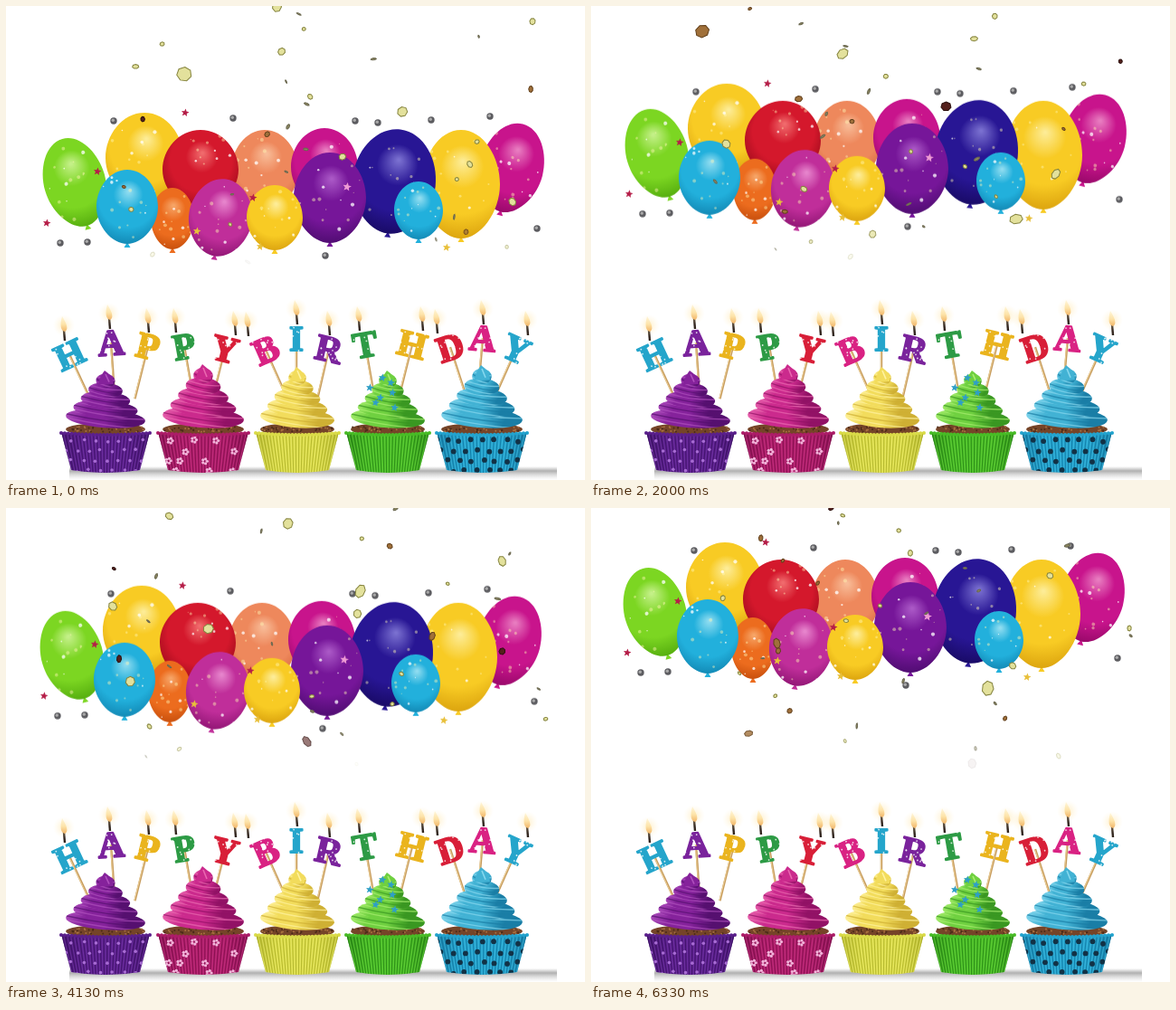
An HTML page with a canvas for the animation above (6390 ms loop, 640x524 px).

```html
<!DOCTYPE html>
<html lang="en">
<head>
<meta charset="utf-8">
<title>Happy Birthday</title>
<style>
html, body { margin: 0; width: 100%; height: 100%; overflow: hidden; background: #fff; }
canvas { display: block; }
</style>
</head>
<body>
<canvas id="stage" width="640" height="524"></canvas>
<script>
const W = 640, H = 524, LOOP = 6390, FRAMES = 96, TAU = Math.PI * 2;
const ctx = document.getElementById('stage').getContext('2d');

function seeded(s) {
  return () => {
    s = (s * 1664525 + 1013904223) >>> 0;
    return s / 4294967296;
  };
}

function layer(draw) {
  const c = document.createElement('canvas');
  c.width = W;
  c.height = H;
  draw(c.getContext('2d'));
  return c;
}

function disc(g, x, y, r, fill) {
  g.fillStyle = fill;
  g.beginPath();
  g.arc(x, y, r, 0, TAU);
  g.fill();
}

function line(g, x1, y1, x2, y2, color, width) {
  g.strokeStyle = color;
  g.lineWidth = width;
  g.beginPath();
  g.moveTo(x1, y1);
  g.lineTo(x2, y2);
  g.stroke();
}

function star(g, x, y, r, fill) {
  g.fillStyle = fill;
  g.beginPath();
  for (let i = 0; i < 10; i++) {
    const a = i * TAU / 10 - 1.4, d = i % 2 ? r * 0.45 : r;
    g.lineTo(x + d * Math.cos(a), y + d * Math.sin(a));
  }
  g.fill();
}

function shade(gradient, colors) {
  colors.forEach((c, i) => gradient.addColorStop(i / (colors.length - 1), c));
  return gradient;
}

// ---- cupcakes ----

const CAKE_TOP = 469, CAKE_BOTTOM = 516;

function frosting(g, x, tip, half, [light, mid, dark]) {
  const base = CAKE_TOP - 3, h = base - tip, tiers = 5;
  for (let i = 0; i < tiers; i++) {
    const rx = half * (1 - i * 0.19), ry = h * (0.165 - i * 0.01);
    g.save();
    g.translate(x, base - h * (0.16 + i * 0.165));
    g.rotate(0.07);
    g.fillStyle = shade(g.createLinearGradient(-rx, -ry, rx * 0.5, ry), [light, mid, mid, dark]);
    g.beginPath();
    g.ellipse(0, 0, rx, ry, 0, 0, TAU);
    g.fill();
    g.clip();
    for (let k = 0; k < 3; k++) {
      g.strokeStyle = k % 2 ? dark : light;
      g.lineWidth = 1.4;
      g.globalAlpha = 0.7;
      g.beginPath();
      g.moveTo(-rx, ry * (k * 0.4 - 0.6));
      g.quadraticCurveTo(rx * 0.1, ry * (0.1 + k * 0.4), rx, ry * (k * 0.5 - 0.2));
      g.stroke();
    }
    g.restore();
  }
  g.fillStyle = mid;
  g.beginPath();
  g.moveTo(x - half * 0.2, base - h * 0.76);
  g.quadraticCurveTo(x - 5, base - h * 0.92, x - 1, tip);
  g.quadraticCurveTo(x + 9, base - h * 0.9, x + half * 0.2, base - h * 0.76);
  g.fill();
  line(g, x, tip + 4, x + 4, base - h * 0.8, light, 1.6);
}

function wrapper(g, x, half, [light, mid, dark], decorate) {
  const foot = half - 11, top = CAKE_TOP, rnd = seeded(x);
  g.fillStyle = '#754428';
  g.beginPath();
  g.ellipse(x, top - 1, half - 5, 7, 0, 0, TAU);
  g.fill();
  for (let i = 0; i < 40; i++) disc(g, x + (rnd() - 0.5) * half * 1.7, top - 4 + rnd() * 6, 1, i % 2 ? '#a8703f' : '#4b2a18');

  g.save();
  g.beginPath();
  g.moveTo(x - half, top + 2);
  g.quadraticCurveTo(x, top + 7, x + half, top + 2);
  g.lineTo(x + foot, CAKE_BOTTOM - 3);
  g.quadraticCurveTo(x, CAKE_BOTTOM + 3, x - foot, CAKE_BOTTOM - 3);
  g.fillStyle = shade(g.createLinearGradient(x - half, 0, x + half, 0), [dark, mid, mid, mid, dark]);
  g.fill();
  g.clip();
  for (let k = -1; k <= 1; k += 0.08) {
    line(g, x + half * k, top, x + foot * k, CAKE_BOTTOM + 2, dark, 0.8);
    line(g, x + half * k + 2, top, x + foot * k + 1.6, CAKE_BOTTOM + 2, light, 0.6);
  }
  if (decorate) {
    for (let row = 0; row < 4; row++) {
      for (let col = -4; col <= 4; col++) {
        decorate(g, x + col * 13 + (row % 2) * 6 + rnd() * 3, top + 10 + row * 11 + rnd() * 3);
      }
    }
  }
  g.restore();
  for (let k = -1; k <= 1; k += 0.08) disc(g, x + half * k, top + 3 + 2 * (1 - k * k), 2, mid);
}

const dots = (g, x, y) => disc(g, x, y, 1.8, '#a86cd4');
const spots = (g, x, y) => disc(g, x, y, 2.9, '#123246');
function flowers(g, x, y) {
  if (Math.round(x) % 2) return;
  for (let a = 0; a < TAU; a += TAU / 5) disc(g, x + 2.6 * Math.cos(a), y + 2.6 * Math.sin(a), 1.6, '#f2b4da');
}

const cupcakes = [
  { x: 110, half: 49, tip: 403, cream: ['#ae4fbd', '#85229b', '#561070'], paper: ['#7b3cae', '#5a1f8c', '#3f1268'], decorate: dots },
  { x: 218, half: 50, tip: 396, cream: ['#ea68b0', '#cb2a8d', '#921266'], paper: ['#cf3c8c', '#ad1c68', '#82104e'], decorate: flowers },
  { x: 322, half: 46, tip: 399, cream: ['#fff2a0', '#f2dc5c', '#cfb034'], paper: ['#f0f074', '#dadb48', '#aeb12a'] },
  { x: 422, half: 46, tip: 403, cream: ['#a8ee70', '#6fd040', '#3a9822'], paper: ['#70da42', '#48bc26', '#288615'] },
  { x: 526, half: 50, tip: 397, cream: ['#86d8ee', '#42b2d4', '#1a7ea6'], paper: ['#48c0e2', '#22a3ce', '#1478a0'], decorate: spots }
];

// ---- letter candles ----

const BLUE = '#25a5cb', PURPLE = '#7a239c', GOLD = '#eab41e', GREEN = '#2d9b45', RED = '#d81f38', PINK = '#d92283';

// letter, colour, centre, tilt in degrees, x of the flame
const candles = [
  ['H', BLUE, 70, 385, -25, 64], ['A', PURPLE, 116, 372, -4, 114], ['P', GOLD, 157, 376, 14, 157],
  ['P', GREEN, 197, 376, -10, 187], ['Y', RED, 242, 379, 14, 253], ['B', PINK, 287, 380, -24, 267],
  ['I', BLUE, 321, 367, 0, 321], ['R', PURPLE, 357, 379, 13, 357], ['T', GREEN, 397, 374, -10, 390],
  ['H', GOLD, 449, 374, 14, 460], ['D', RED, 491, 377, -18, 476], ['A', PINK, 527, 367, 5, 527],
  ['Y', BLUE, 564, 379, 24, 576]
];

function stick(g, [, , x, y, tilt]) {
  g.save();
  g.translate(x, y);
  g.rotate(tilt * TAU / 360);
  line(g, 0, 0, 0, 60, '#c69b5c', 2.4);
  line(g, -0.6, 0, -0.6, 60, '#ecd09a', 1);
  g.restore();
}

function letter(g, [text, color, x, y, tilt]) {
  const rnd = seeded(x * 31);
  g.save();
  g.translate(x, y);
  g.rotate(tilt * TAU / 360);
  g.font = 'bold 41px "Liberation Serif", "Noto Serif", serif';
  g.textAlign = 'center';
  g.lineJoin = 'round';
  g.fillStyle = g.strokeStyle = color;
  g.lineWidth = 2;
  g.strokeText(text, 0, 14);
  g.fillText(text, 0, 14);
  g.globalCompositeOperation = 'source-atop';
  for (let i = 0; i < 14; i++) disc(g, rnd() * 26 - 13, rnd() * 28 - 14, 0.9, 'rgba(255,255,255,.8)');
  g.restore();
}

function flame(g, [, , , cy, , x]) {
  const y = cy - 32;
  line(g, x, y + 5, x + 1, y + 17, '#33271f', 2.4);
  disc(g, x, y, 12, shade(g.createRadialGradient(x, y, 1, x, y, 12), ['rgba(255,228,160,.5)', 'rgba(255,240,205,0)']));
  g.fillStyle = shade(g.createLinearGradient(0, y - 10, 0, y + 8), ['#fff6da', '#fde3a8', '#f0b060']);
  g.beginPath();
  g.moveTo(x - 2, y - 10);
  g.quadraticCurveTo(x + 7, y + 4, x + 1, y + 7);
  g.quadraticCurveTo(x - 6, y + 5, x - 2, y - 10);
  g.fill();
}

const lettering = layer(g => candles.forEach(c => letter(g, c)));

const table = layer(g => {
  g.fillStyle = '#fff';
  g.fillRect(0, 0, W, H);
  g.fillStyle = shade(g.createLinearGradient(0, 509, 0, 524),
    ['rgba(120,120,120,0)', 'rgba(110,110,110,.55)', 'rgba(160,160,160,.3)', 'rgba(200,200,200,0)']);
  g.fillRect(70, 509, 539, 15);
  candles.forEach(c => stick(g, c));
  for (const c of cupcakes) {
    wrapper(g, c.x, c.half, c.paper, c.decorate);
    frosting(g, c.x, c.tip, c.half - 5, c.cream);
  }
  for (let i = 0; i < 7; i++) star(g, 416 + 14 * Math.sin(i * 2.4), 411 + i * 5.5, 4.5, '#2f9fc6');
  g.drawImage(lettering, 0, 0);
  candles.forEach(c => flame(g, c));
});

// ---- balloons ----

function balloon(g, x, y, rx, ry, [light, mid, dark], tilt = 0) {
  const rnd = seeded(x * 17 + y);
  g.save();
  g.translate(x, y);
  g.rotate(tilt);
  g.fillStyle = mid;
  g.beginPath();
  g.moveTo(0, ry - 2);
  g.lineTo(-3.5, ry + 4);
  g.lineTo(3.5, ry + 4);
  g.fill();
  g.beginPath();
  g.moveTo(0, -ry);
  for (const s of [1, -1]) {
    const far = s * ry;
    g.bezierCurveTo(s * rx * 0.58, -far * s, s * rx, -far * s * 0.5, s * rx, 0);
    g.bezierCurveTo(s * rx, ry * 0.52, s * rx * 0.5, ry, 0, ry);
    if (s > 0) g.lineTo(0, -ry);
  }
  g.fillStyle = shade(g.createRadialGradient(rx * 0.05, -ry * 0.42, 1, 0, -ry * 0.12, ry * 1.15), [light, mid, mid, dark]);
  g.fill();
  g.clip();
  for (let i = 0; i < 15; i++) {
    disc(g, (rnd() - 0.5) * 1.7 * rx, (rnd() - 0.5) * 1.7 * ry, 0.6 + rnd() * 1.5,
      i % 3 ? 'rgba(255,245,180,.45)' : 'rgba(255,255,255,.75)');
  }
  g.restore();
}

const LIME = ['#c4f088', '#7cd622', '#54ac0e'], YELLOW = ['#fdec96', '#f8cb24', '#dba30e'];
const ROSE = ['#e87cc0', '#c8148c', '#960868'], SKY = ['#8edcf0', '#22b0dc', '#1288b4'];

const bunch = layer(g => {
  balloon(g, 76, 195, 34, 50, LIME, -0.28);
  balloon(g, 153, 168, 43, 50, YELLOW);
  balloon(g, 286, 182, 37, 45, ['#f8bc98', '#ee885c', '#d6663a']);
  balloon(g, 215, 181, 42, 44, ['#f06a6c', '#d4182c', '#a00c1c']);
  balloon(g, 352, 178, 37, 43, ROSE);
  balloon(g, 559, 179, 35, 50, ROSE, 0.25);
  balloon(g, 503, 197, 43, 60, YELLOW);
  balloon(g, 429, 194, 46, 58, ['#7a70d0', '#281694', '#180a64'], 0.12);
  balloon(g, 184, 235, 24, 34, ['#f6a466', '#ec6c1e', '#c64e0c']);
  balloon(g, 134, 222, 34, 41, SKY);
  balloon(g, 237, 234, 35, 43, ['#e684cc', '#c02e9a', '#901574'], 0.15);
  balloon(g, 358, 212, 40, 50, ['#aa58c6', '#761699', '#4e0c70']);
  balloon(g, 297, 234, 31, 36, YELLOW);
  balloon(g, 456, 226, 27, 32, SKY);
  for (const [x, y] of [[119, 127], [251, 124], [386, 127], [411, 129], [470, 126], [535, 122], [90, 261], [60, 262], [353, 276], [587, 246]]) {
    disc(g, x, y, 3.7, '#5c5c60');
    disc(g, x - 0.7, y - 0.7, 1.7, '#aaa');
  }
  for (const [x, y] of [[198, 118], [101, 183], [45, 240], [273, 212]]) star(g, x, y, 4.5, '#b51e48');
  for (const [x, y] of [[487, 267], [281, 266], [211, 249]]) star(g, x, y, 4.5, '#e8c03a');
  star(g, 377, 200, 5, '#ee9ad4');
});

// The bunch opens at rest, then rises in 100 ms steps, restarting low on each cycle.
function lift(t) {
  if (t < 60) return [0, 0];
  const i = Math.floor(t / 100) % 21;
  return i < 9 ? [-5 + i * 0.42, -80 - i * 13] : [-4 + (i - 12) * 0.12, 95 - (i - 12) * 15.9];
}

// ---- confetti ----

const FALL = 0.4, SHOWER = 5400, FADE = 240, GONE = 285;
const PALE = ['#e3e19c', '#85843f'], BROWN = ['#a0703a', '#62401c'], DARK = ['#54201c', '#2c100e'], DULL = ['#8b8660', '#6b6850'];

const rnd = seeded(41);
const bits = Array.from({ length: 260 }, (_, i) => {
  const sliver = i % 3 === 0, pick = rnd();
  return {
    x: 116 + rnd() * 486,
    born: i * SHOWER / 260,
    r: sliver ? 1.5 + rnd() * 2 : 2 + rnd() * rnd() * 6.5,
    flat: sliver ? 0.25 + rnd() * 0.3 : 0.6 + rnd() * 0.35,
    turn: rnd() * TAU,
    color: sliver ? DULL : pick < 0.66 ? PALE : pick < 0.88 ? BROWN : DARK
  };
});

function confetti(t) {
  for (const b of bits) {
    const age = (t - b.born + SHOWER * 2) % SHOWER, y = age * FALL - 8;
    if (y > GONE) continue;
    ctx.save();
    ctx.globalAlpha = Math.min(1, (GONE - y) / (GONE - FADE));
    ctx.translate(b.x, y);
    ctx.rotate(b.turn + age * 0.002);
    ctx.beginPath();
    for (let a = 0; a < TAU - 0.1; a += TAU / 7) ctx.lineTo(b.r * b.flat * Math.cos(a), b.r * Math.sin(a));
    ctx.closePath();
    ctx.fillStyle = b.color[0];
    ctx.strokeStyle = b.color[1];
    ctx.lineWidth = 1;
    ctx.fill();
    ctx.stroke();
    ctx.restore();
  }
}

function draw(now) {
  const frame = Math.floor((now % LOOP) / (LOOP / FRAMES));
  const t = frame * 200 / 3 + 0.5;
  ctx.drawImage(table, 0, 0);
  ctx.drawImage(bunch, ...lift(t));
  confetti(t);
}

const start = performance.now();
function tick() {
  draw(performance.now() - start);
  requestAnimationFrame(tick);
}
tick();
</script>
</body>
</html>
```
